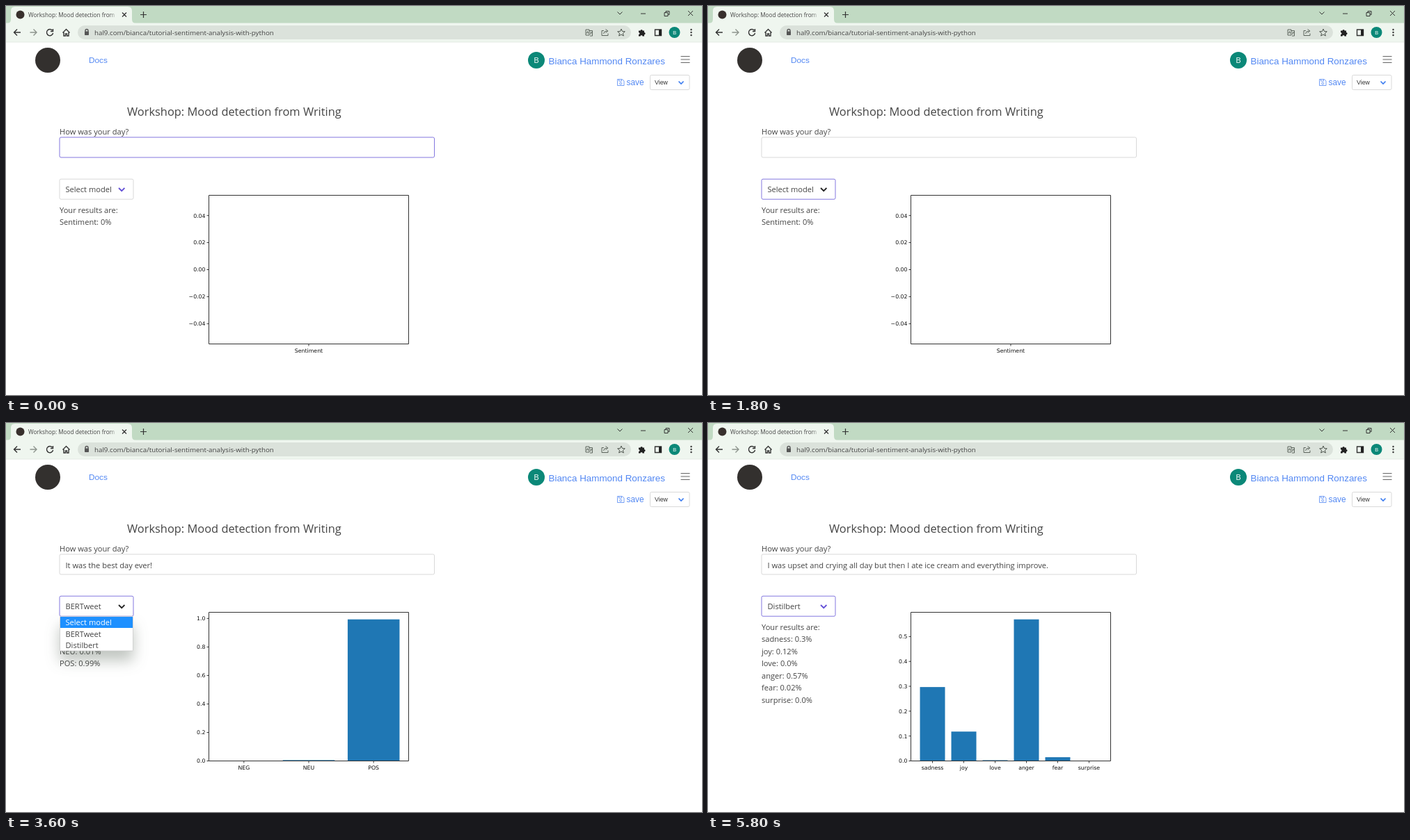
An HTML page that plays this animation: 1000x560 px, repeating every 6 s.

```html
<!DOCTYPE html>
<html lang="en">
<head>
<meta charset="utf-8">
<title>Mood detection</title>
<style>
  html, body { margin: 0; width: 100%; height: 100%; overflow: hidden; background: #fff; }
  svg { display: block; width: 1000px; height: 560px; }
  text { font: 11.1px "Open Sans", sans-serif; fill: #444; white-space: pre; }
  .arial { font-family: "Liberation Sans", Arial, sans-serif; fill: #5388f3; }
  .axis text { font: 7.8px "DejaVu Sans", sans-serif; fill: #111; }
  .line { fill: none; stroke: #333; stroke-width: 1.4; }
  .box { fill: #fff; stroke: #d9d9d9; }
  .focus { stroke: #8377df; }
  .menu { filter: drop-shadow(0 14px 10px rgba(50, 65, 50, .3)); }
</style>
</head>
<body>
<svg viewBox="0 0 1000 560">
  <defs>
    <linearGradient id="fade"><stop stop-color="#eff6ef" stop-opacity="0"/><stop offset="1" stop-color="#eff6ef"/></linearGradient>
  </defs>

  <!-- browser -->
  <rect width="1000" height="25" fill="#c1dac3"/>
  <path d="M1 25Q7 25 7 19V7Q7 1 13 1H175Q181 1 181 7V19Q181 25 187 25V52H0V25Z" fill="#eff6ef"/>
  <rect y="24.5" width="1000" height="27.5" fill="#eff6ef"/>
  <path d="M0 52H1000" stroke="#dfe6df" stroke-width=".8"/>
  <circle cx="20.500" cy="12.500" r="6" fill="#38302d"/>
  <text x="32" y="15.500" style="font-size:8.2px">Workshop: Mood detection from</text>
  <rect x="148" y="4" width="14" height="17" fill="url(#fade)"/>
  <rect x="103" y="28" width="795" height="20" rx="10" fill="#dbe2db"/>
  <text x="127" y="41.700" style="font-size:9.76px">hal9.com/bianca/tutorial-sentiment-analysis-with-python</text>
  <g class="line">
    <path d="M167 9.500l6 6m0-6l-6 6M193 12.500h9m-4.500-4.500v9" stroke-width="1.200"/>
    <path d="M21 38H11.500m4.500-4.500L11.500 38l4.500 4.500"/>
    <path d="M34.500 38H44m-4.500-4.500L44 38l-4.500 4.500" stroke="#8d948d"/>
    <path d="M66.500 35A4.600 4.600 0 1 0 67.600 39M67.500 33v3.500h-3.500"/>
    <path d="M81.500 38.500l5-5 5 5M83 38v5h2.500v-3h2v3H90v-5"/>
    <path d="M114 37v-1.500a2 2 0 0 1 4 0V37" stroke="#555"/>
    <g style="stroke-width:1">
      <path d="M878.500 8.500l3.500 3.500 3.500-3.500M912 11h7M946 9.500h5v5h-5zM948 9V7.500h5v5h-1.500M980 7l7 7m0-7l-7 7"/>
      <path d="M833 34h5v8h-5zM838 35.500h4.500v7.500H839M834.300 39.500l1.200-3 1.200 3M839.500 38h2.500m-1.200 0l-1 3" stroke="#5d655d"/>
      <path d="M859 35.500h-3v7h9v-3M858.500 40q.5-4 5-4m-2-2.500l3.500 2.500-3.500 2.500" stroke="#5d655d"/>
      <path d="M884 33l1.500 3.500 3.800.3-2.900 2.500.9 3.700-3.300-2-3.300 2 .9-3.700-2.900-2.500 3.800-.3z" stroke="#4b524b"/>
    </g>
    <path d="M932.500 34h9v8.500h-9z"/>
  </g>
  <rect x="113" y="36.500" width="6" height="5.500" rx=".7" fill="#555"/>
  <path d="M909 35.500h2.500a1.600 1.600 0 0 1 3.200 0h2.300v2.500a1.600 1.600 0 0 1 0 3.200v2.300h-2.500a1.500 1.500 0 0 0-3 0H909v-2.500a1.500 1.500 0 0 0 0-3zM938 34h4v8.500h-4z" fill="#222"/>
  <circle cx="960.500" cy="38" r="8" fill="#0b8878"/>
  <text x="960.500" y="41.100" text-anchor="middle" style="font-size:8px;fill:#fff">B</text>
  <g fill="#333"><circle cx="984.500" cy="34" r="1.200"/><circle cx="984.500" cy="38" r="1.200"/><circle cx="984.500" cy="42" r="1.200"/></g>

  <!-- page header -->
  <circle cx="60" cy="78" r="18" fill="#33302e"/>
  <text class="arial" x="119" y="82" style="font-size:11.8px">Docs</text>
  <circle cx="762" cy="78" r="12" fill="#0b8878"/>
  <text x="762" y="82.200" text-anchor="middle" style="font-size:11.500px;fill:#fff">B</text>
  <text class="arial" x="779.500" y="83.500" style="font-size:13.4px">Bianca Hammond Ronzares</text>
  <path class="line" d="M969.500 72.500h13m-13 4.500h13m-13 4.500h13" style="stroke:#666;stroke-width:1.200"/>
  <path class="line" d="M878.500 105.500h7l2.500 2.500v6.500h-9.500zM880.500 105.500v2.500h4v-2.500M881.700 111.500a1.500 1.500 0 1 0 3 0a1.500 1.500 0 1 0-3 0" style="stroke:#5388f3;stroke-width:.8"/>
  <text class="arial" x="891.500" y="113.500" style="font-size:11.9px">save</text>
  <rect class="box" x="925.500" y="99.500" width="56.500" height="21" rx="2"/>
  <text class="arial" x="932" y="113" style="font-size:8.8px;fill:#333">View</text>
  <path class="line" d="M966.500 108.500l3.500 3.500 3.500-3.500" style="stroke:#3d7df0;stroke-width:1.700"/>

  <text x="174" y="158" style="font-size:16.4px">Workshop: Mood detection from Writing</text>
  <text x="77" y="184.800">How was your day?</text>
  <g id="app"></g>
</svg>
<script>
const app = document.getElementById('app');
const models = ['Select model', 'BERTweet', 'Distilbert'];
const tones = ['NEG', 'NEU', 'POS'];
const moods = ['sadness', 'joy', 'love', 'anger', 'fear', 'surprise'];

// labels, bar heights, printed scores
const results = {
  none: [['Sentiment'], [0], [0]],
  weird: [tones, [.05, .299, .65], ['0.05', '0.3', '0.65']],
  bestMood: [moods, [.003, .9935, 0, .003, 0, 0], ['0.0', '0.99', '0.0', '0.0', '0.0', '0.0']],
  bestTone: [tones, [.002, .006, .9935], ['0.0', '0.01', '0.99']],
  upset: [tones, [.982, .0135, .005], ['0.98', '0.01', '0.0']],
  mixed: [moods, [.297, .118, .003, .569, .015, 0], ['0.3', '0.12', '0.0', '0.57', '0.02', '0.0']]
};
const weird = 'It was a weird day.', best = 'It was the best day ever!';
const upset = 'I was upset and crying all day';
const mixed = upset + ' but then I ate ice cream and everything improve.';

// start, typed text, model, result, focus (input, select, press, or highlighted menu row)
const steps = [
  [0, '', 0, 'none', 'input'],
  [200, weird, 0, 'none', 'input'],
  [400, weird, 0, 'none', 1],
  [600, weird, 1, 'none', 'select'],
  [800, weird, 1, 'weird', 'select'],
  [1400, weird, 1, 'weird', 0],
  [1600, '', 0, 'none', 'input'],
  [1800, '', 0, 'none', 'press'],
  [2000, best.slice(0, 15), 0, 'none', 'input'],
  [2200, best, 0, 'none', 2],
  [2400, best, 2, 'none', 'select'],
  [2600, best, 2, 'bestMood', 'select'],
  [3000, best, 2, 'bestMood', 1],
  [3200, best, 1, 'bestMood', 'select'],
  [3400, best, 1, 'bestTone', 'select'],
  [3600, best, 1, 'bestTone', 0],
  [3800, best, 0, 'none', 'select'],
  [4000, '', 0, 'none', 'input'],
  [4200, upset.slice(0, 11), 0, 'none', 'input'],
  [4400, upset, 0, 'none', 'input'],
  [4600, upset, 0, 'none', 1],
  [4800, upset, 1, 'none', 'select'],
  [5000, upset, 1, 'upset', 'select'],
  [5200, mixed.slice(0, 45), 1, 'upset', 'input'],
  [5400, mixed, 1, 'upset', 'input'],
  [5600, mixed, 1, 'upset', 2],
  [5800, mixed, 2, 'mixed', 'select']
];

const text = (x, y, s, more = '') => `<text x="${x}" y="${y}" ${more}>${s}</text>`;
const rect = (x, y, w, h, more) => `<rect x="${x}" y="${y}" width="${w}" height="${h}" ${more}/>`;
const field = (y, w, focused) => rect(77, y, w, 29, `rx="2" class="box ${focused ? 'focus' : ''}"`);

function chart([labels, values]) {
  const left = 291.5, top = 272.5, width = 287, height = 214, bottom = top + height;
  const n = labels.length, peak = Math.max(...values);
  const lo = peak ? 0 : -.055, hi = peak ? peak * 1.05 : .055;
  const tick = peak ? (peak > .8 ? .2 : .1) : .02;
  const yOf = v => bottom - (v - lo) / (hi - lo) * height;
  const unit = width / (n - .2) / 1.1;
  let out = '', marks = '';
  values.forEach((v, i) => {
    const x = left + width / 2 + (i - (n - 1) / 2) * unit;
    if (v) out += rect(x - .4 * unit, yOf(v), .8 * unit, bottom - yOf(v), 'fill="#1f77b4"');
    marks += `M${x} ${bottom}v3`;
    out += text(x, 498.6, labels[i], 'text-anchor="middle"');
  });
  for (let k = Math.ceil(lo / tick); k * tick <= hi; k++) {
    const y = yOf(k * tick);
    const label = Math.abs(k * tick).toFixed(peak ? 1 : 2);
    marks += `M${left} ${y}h-3`;
    out += text(286.5, y + 2.9, (k < 0 ? '−' : '') + label, 'text-anchor="end"');
  }
  return `<g class="axis">${out}<path d="${marks}M${left} ${top}h${width}v${height}h${-width}z" fill="none" stroke="#333"/></g>`;
}

function menu(row) {
  return '<g class="menu">' + rect(77.5, 278.5, 105, 49.5, 'rx="1" fill="#fff" stroke="#ccc" stroke-width=".8"') + '</g>' +
    rect(78, 279 + row * 16.2, 104, 16, 'fill="#1e90ff"') +
    models.map((m, i) => text(85.5, 291.3 + i * 16.2, m, i === row ? 'style="fill:#fff"' : '')).join('');
}

function draw([, typed, model, key, focus]) {
  const result = results[key], open = typeof focus === 'number';
  const dark = open || focus === 'press';
  const lines = ['Your results are:', ...result[0].map((name, i) => `${name}: ${result[2][i]}%`)];
  app.innerHTML =
    field(189, 538.5, focus === 'input') + text(85.5, 208.7, typed) +
    field(249.2, 106, focus !== 'input') + text(85.5, 268.3, models[model]) +
    `<path class="line" d="M162 262l4.200 4.200 4.200-4.200" style="stroke:${dark ? '#222' : '#6350d6'};stroke-width:1.8"/>` +
    lines.map((s, i) => text(77, 297.6 + i * 17.55, s)).join('') +
    chart(result) + (open ? menu(focus) : '');
}

let shown;
function frame() {
  const t = performance.now() % 6000;
  const step = steps.findLast(s => s[0] <= t);
  if (step !== shown) draw(shown = step);
  requestAnimationFrame(frame);
}
frame();
</script>
</body>
</html>
```
